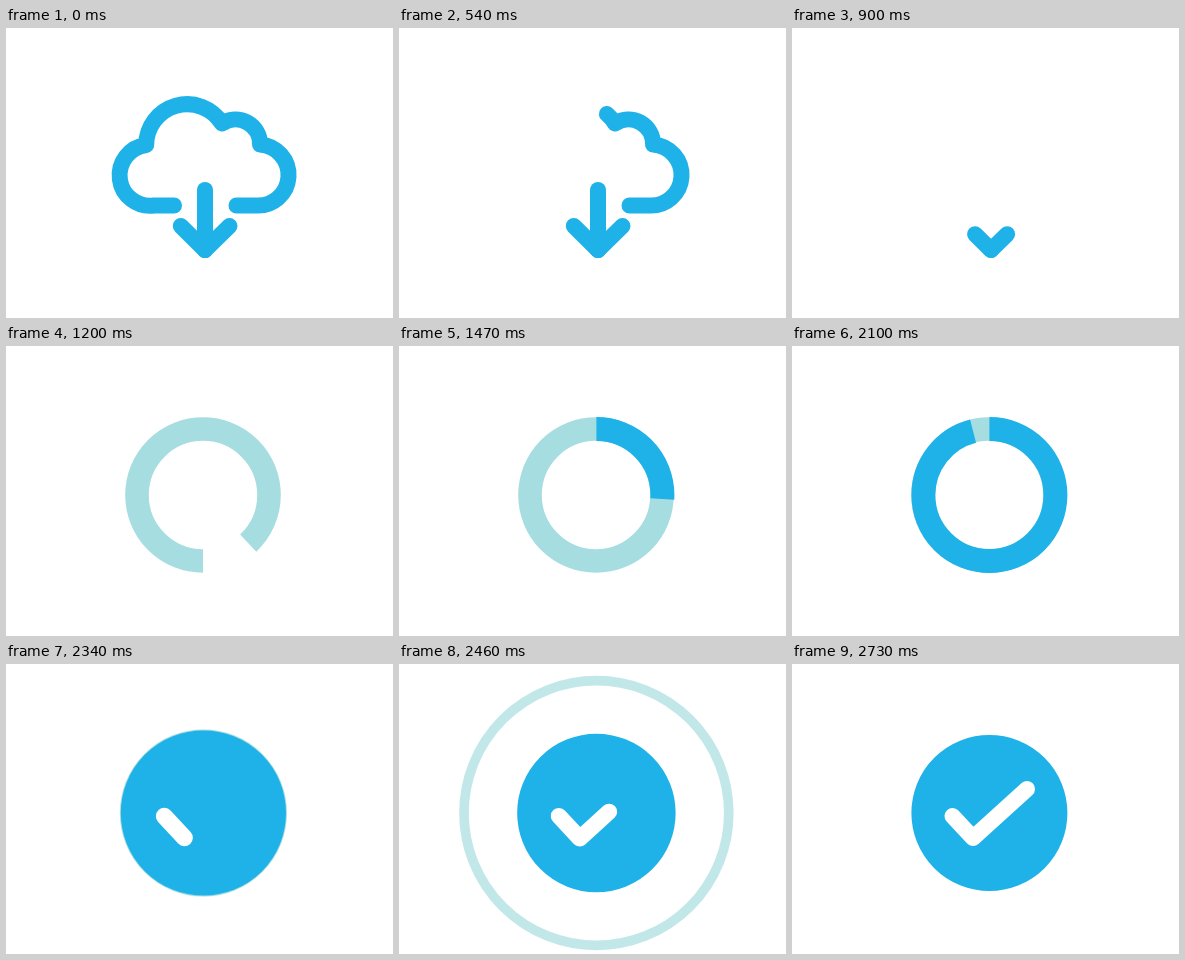
An HTML page for the animation above (4500 ms loop, 387 px wide and 290 px high).

```html
<!DOCTYPE html>
<html lang="en">
<head>
<meta charset="utf-8">
<title>Download complete</title>
<style>
  html, body { margin: 0; height: 100%; overflow: hidden; background: #fff; }
  svg { display: block; width: 100%; height: 100%; fill: none; stroke: #1eb2e8; }
  .line { stroke-width: 16; stroke-linecap: round; stroke-linejoin: round; }
  .light { stroke: #a6dde0; }
</style>
</head>
<body>
<svg viewBox="0 0 387 290">
  <circle id="ripple" class="light" cx="197.4" cy="149"/>
  <circle id="track" class="light" cx="197" cy="149" r="66" stroke-width="23.6" pathLength="1" transform="rotate(90 197 149)"/>
  <g id="badge">
    <circle id="ring" cx="197.4" cy="149" pathLength="1" transform="rotate(-90 197.4 149)"/>
    <path id="check" class="line" stroke="#fff" style="stroke: #fff" pathLength="1" d="M160.5 152 181 174 235 125"/>
  </g>
  <path id="cloud" class="line" pathLength="1" d="M168 177.5H148A30.2 30.2 0 0 1 140.2 117A41 41 0 0 1 216 95.500A24.500 24.500 0 0 1 254 116.500A30.500 30.500 0 0 1 250 177.500H230.500"/>
  <path id="shaft" class="line" pathLength="1" d="M199 162V222"/>
  <path id="leftTip" class="line" pathLength="1" d="M174.800 198 199 222"/>
  <path id="rightTip" class="line" pathLength="1" d="M223.500 198 199 222"/>
</svg>
<script>
const LOOP = 4500;
const $ = id => document.getElementById(id);
const [ripple, track, badge, ring, check, cloud, shaft, leftTip, rightTip] =
  ['ripple', 'track', 'badge', 'ring', 'check', 'cloud', 'shaft', 'leftTip', 'rightTip'].map($);

const span = (t, from, to) => Math.min(1, Math.max(0, (t - from) / (to - from)));

function set(el, attrs) {
  for (const key in attrs) el.setAttribute(key, attrs[key]);
}

// Show only the part of a path between the fractions a and b.
function trim(el, a, b) {
  const full = a === 0 && b === 1;
  set(el, {
    visibility: b > a ? 'visible' : 'hidden',
    'stroke-dasharray': full ? 'none' : `${b - a} 2`,
    'stroke-dashoffset': -a
  });
}

function draw(t) {
  trim(cloud, span(t, 300, 750), 1);
  trim(shaft, span(t, 690, 830), 1);
  const tip = span(t, 860, 980);
  trim(leftTip, tip, 1);
  trim(rightTip, tip, 1);

  trim(track, 0, t < 2140 ? span(t, 930, 1238) : 0);
  trim(ring, 0, span(t, 1237, 2137));

  // The hole closes, then the disc pulses and sends out a ripple.
  const hole = 54 * (1 - span(t, 2137, 2250));
  set(ring, { r: (78 + hole) / 2, 'stroke-width': 78 - hole });
  const scale = 1 + 0.062 * Math.sin(Math.PI * span(t, 2250, 2480));
  set(badge, { transform: `translate(197.4 149) scale(${scale}) translate(-197.4 -149)` });
  trim(check, 0, span(t, 2260, 2560));

  const p = span(t, 2340, 2730);
  set(ripple, {
    visibility: p > 0 && p < 1 ? 'visible' : 'hidden',
    r: 76 + 101 * (1 - (1 - p) ** 2.2),
    'stroke-width': 14 * (1 - p),
    opacity: 1 - p
  });
}

const start = performance.now();
function frame() {
  draw((performance.now() - start) % LOOP);
  requestAnimationFrame(frame);
}
frame();
</script>
</body>
</html>
```
